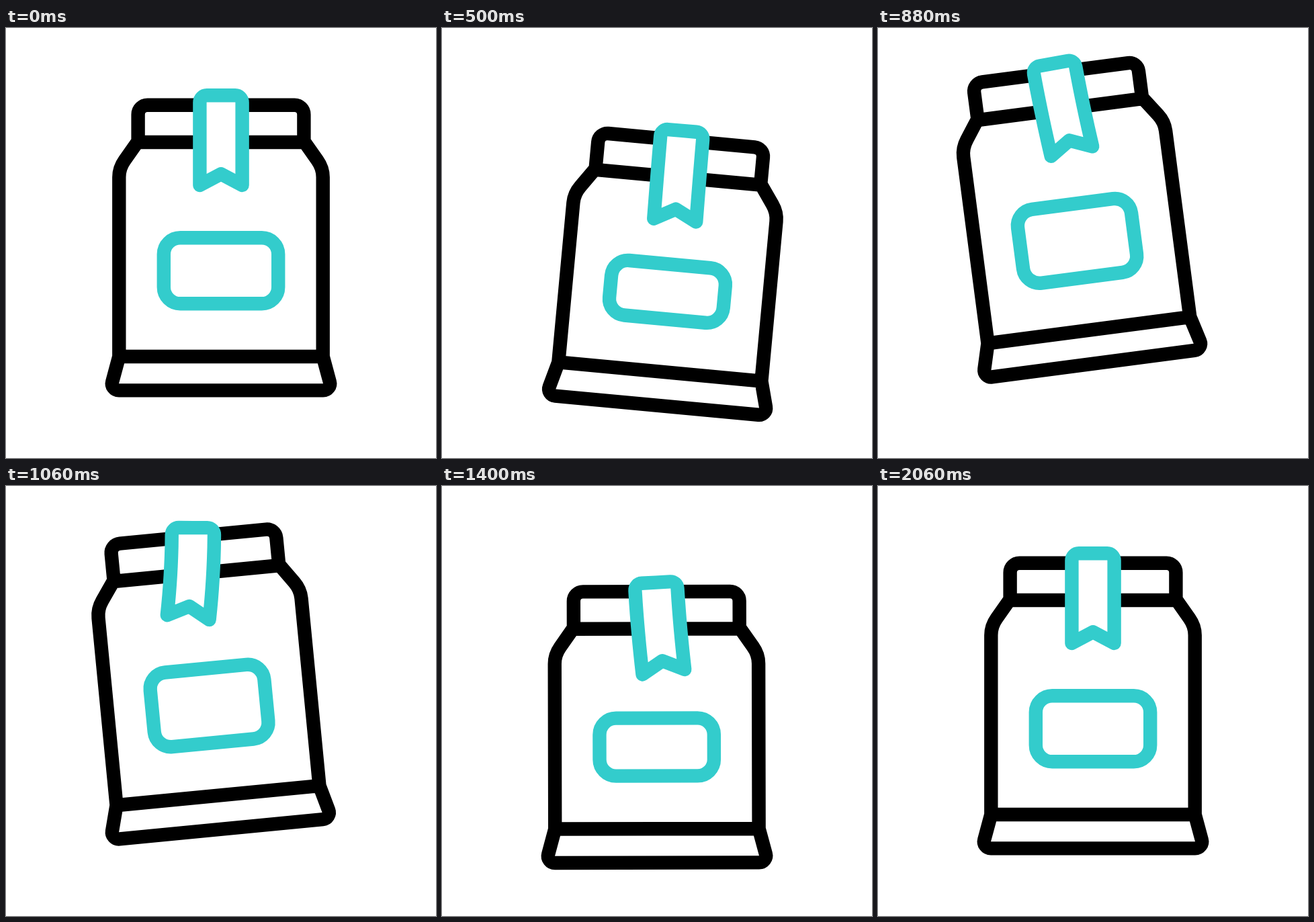
Write an HTML page with a canvas that moves like this. It is 640 px wide and 640 px high and loops after 2.16 s.

```html
<!DOCTYPE html>
<html lang="en">
<head>
<meta charset="utf-8">
<title>Hopping bag</title>
<style>
html, body { margin: 0; width: 100%; height: 100%; overflow: hidden; background: #fff; }
canvas { display: block; width: 640px; height: 640px; }
</style>
</head>
<body>
<canvas id="stage"></canvas>
<script>
const LOOP = 2160, STEP = 20, SIZE = 640;
const MID = 320, PIVOT = 536;
const INK = '#000', TEAL = '#33cccc';
const canvas = document.getElementById('stage');
const ctx = canvas.getContext('2d');
const ratio = window.devicePixelRatio || 1;
canvas.width = canvas.height = SIZE * ratio;

const rad = deg => deg * Math.PI / 180;
const ease = x => (1 - Math.cos(Math.PI * Math.min(1, Math.max(0, x)))) / 2;

// Sine easing from one turning point [time, value] to the next.
function wave(t, points) {
  let [from, value] = points[0];
  for (const [to, next] of points.slice(1)) {
    if (t <= to) return value + (next - value) * ease((t - from) / (to - from));
    from = to;
    value = next;
  }
  return value;
}

// Crouch, hop, land, rebound, rest.
const lift = t => wave(t, [[200, 0], [440, 25], [900, -40], [990, -40], [1280, 43.5], [1560, -13.8], [2060, 0]]);
const squash = t => wave(t, [[200, 0], [440, 30], [940, -14], [1040, -14], [1280, 41], [1560, -9.8], [2060, 0]]);
const lean = t => wave(t, [[250, 0], [630, 7.2], [960, -9.8], [1240, 5.3], [1505, -2.9], [1960, 0]]);
const swing = t => wave(t, [[440, 0], [780, -5.6], [1080, 5.7], [1380, -3.2], [1680, 3.6], [2060, 0]]);

function drawBag(u) {
  ctx.strokeStyle = INK;
  ctx.beginPath();
  // top band
  ctx.moveTo(196.6, 170 + u);
  ctx.arcTo(196.6, 114.7 + u, MID, 114.7 + u, 14);
  ctx.arcTo(443.4, 114.7 + u, 443.4, 170 + u, 14);
  ctx.lineTo(443.4, 170 + u);
  ctx.closePath();
  // sides
  for (const s of [-1, 1]) {
    const x = d => MID + s * d;
    ctx.moveTo(x(124.5), 170 + u);
    ctx.lineTo(x(143.5), 197 + u);
    ctx.quadraticCurveTo(x(151.7), 208.5 + u, x(151.7), 222 + u);
    ctx.lineTo(x(151.7), 489);
  }
  // foot
  ctx.moveTo(168.3, 489);
  ctx.arcTo(154.7, 539.4, MID, 539.4, 10.2);
  ctx.arcTo(485.3, 539.4, 471.7, 489, 10.2);
  ctx.lineTo(471.7, 489);
  ctx.closePath();
  ctx.stroke();
}

// The label gives way less than the bag when pressed.
function drawLabel(u) {
  const top = 312.2 + (u > 0 ? 0.57 * u : u);
  ctx.strokeStyle = TEAL;
  ctx.beginPath();
  ctx.roundRect(234.8, top, 170.4, 410.3 - top, 24.5);
  ctx.stroke();
}

// A strip that hangs from the band and bends more towards its tips.
function drawRibbon(u, tilt) {
  const half = 31.6, len = 133.7, hook = 15, shoulder = 14, parts = 8;
  const drop = 100.3 + hook + u + Math.abs(tilt) / 4;
  const angle = y => rad(tilt) * (1 + 1.1 * y / len);
  const bend = (x, y) => {
    const a = angle((y + hook) / 2), b = angle(y), d = y - hook;
    return [MID - d * Math.sin(a) + x * Math.cos(b),
            drop + d * Math.cos(a) + x * Math.sin(b)];
  };
  const line = (x, y) => ctx.lineTo(...bend(x, y));
  const side = i => shoulder + (len - shoulder) * i / parts;
  ctx.beginPath();
  ctx.moveTo(...bend(0, 0));
  ctx.arcTo(...bend(half, 0), ...bend(half, 20), 10.4);
  for (let i = 1; i <= parts; i++) line(half, side(i));
  line(0, 117);
  for (let i = parts; i > 0; i--) line(-half, side(i));
  ctx.arcTo(...bend(-half, 0), ...bend(0, 0), 10.4);
  ctx.closePath();
  ctx.fillStyle = '#fff';
  ctx.fill();
  ctx.strokeStyle = TEAL;
  ctx.stroke();
}

function draw(t) {
  const u = squash(t);
  ctx.setTransform(ratio, 0, 0, ratio, 0, 0);
  ctx.fillStyle = '#fff';
  ctx.fillRect(0, 0, SIZE, SIZE);
  ctx.lineWidth = 20.4;
  ctx.lineJoin = ctx.lineCap = 'round';
  ctx.translate(MID, PIVOT + lift(t));
  ctx.rotate(rad(lean(t)));
  ctx.translate(-MID, -PIVOT);
  drawBag(u);
  drawLabel(u);
  drawRibbon(u, swing(t));
}

const start = performance.now();
function tick() {
  const t = (performance.now() - start) % LOOP;
  draw(Math.floor(t / STEP) * STEP);
  requestAnimationFrame(tick);
}
tick();
</script>
</body>
</html>
```
